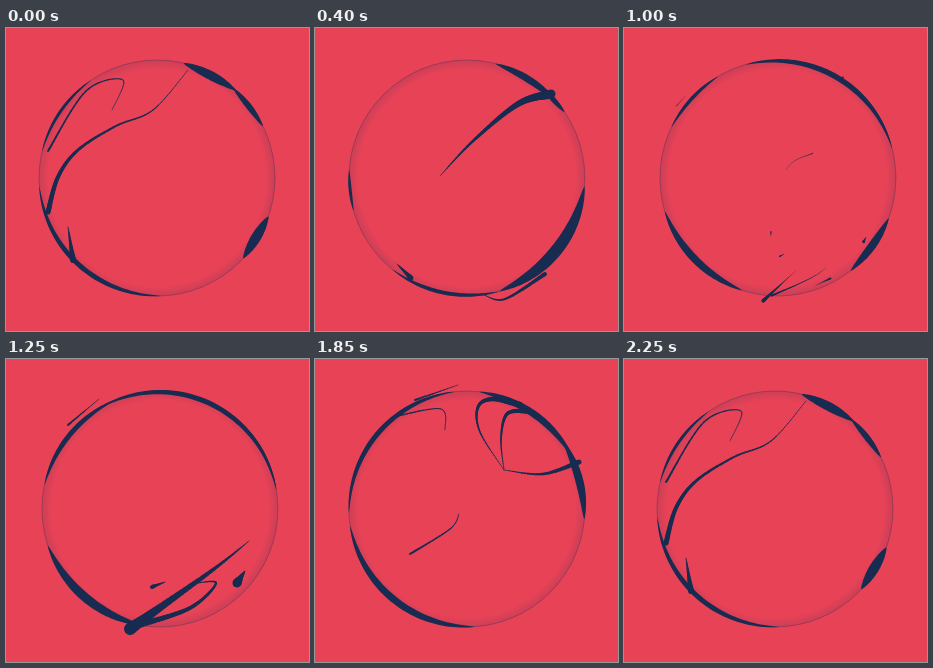
Write an HTML page with a canvas that moves like this. It is 303 px wide and 303 px high and loops after 2300 ms.

```html
<!DOCTYPE html>
<html lang="en">
<head>
<meta charset="utf-8">
<title>Ink sphere</title>
<style>
html, body { margin: 0; height: 100%; overflow: hidden; background: #e84257; }
canvas { display: block; width: 100vw; height: 100vh; }
</style>
</head>
<body>
<canvas id="stage" width="303" height="303"></canvas>
<script>
const ctx = document.getElementById('stage').getContext('2d');
const RED = '#e84257', NAVY = '#182b50', R = 118, CY = 150, LOOP = 2300, STEP = 50, END = 2250;

// rim: five ink patches as [from, to, thickness], angles in degrees.
// strands: [root thickness, x, y, x, y, ...], thinning toward the tip.
const swoosh = {
  at: 0,
  rim: [[193, 236, 3], [283, 312, 9], [310, 334, 6], [19, 43, 10], [88, 176, 5]],
  strands: [
    [5, 42, 184, 52, 149, 72, 122, 110, 98, 147, 82, 182, 42],
    [2, 42, 123, 80, 63, 117, 52, 106, 82],
    [6, 67, 232, 62, 199]]
};
const spear = {
  at: 400,
  rim: [[164, 184, 3], [284, 320, 7], [310, 326, 5], [4, 74, 12], [74, 129, 4]],
  strands: [
    [9, 236, 66, 203, 76, 158, 113, 125, 148],
    [4, 230, 246, 190, 271, 169, 267],
    [5, 96, 250, 82, 236]]
};
const drips = {
  at: 750,
  rim: [[219, 231, 2], [273, 337, 6], [300, 340, 3], [10, 62, 16], [117, 165, 6]],
  strands: [
    [1.5, 185, 121, 163, 136, 152, 170, 153, 200],
    [2, 153, 204, 154, 216],
    [5, 205, 42, 204, 55],
    [6, 218, 243, 179, 268]]
};
const splash = {
  at: 1250,
  rim: [[192, 248, 5], [235, 350, 5], [300, 351, 3], [30, 42, 0], [98, 162, 9]],
  strands: [
    [12, 124, 270, 152, 250, 208, 210, 243, 182],
    [6, 133, 266, 184, 249, 210, 224, 185, 225],
    [9, 231, 224, 239, 212],
    [4, 146, 228, 159, 223],
    [2, 62, 66, 93, 40]]
};
const crack = {
  at: 1600,
  rim: [[176, 272, 6], [255, 322, 4], [317, 342, 8], [0, 17, 8], [62, 152, 11]],
  strands: [
    [6, 265, 179, 230, 180, 207, 159, 180, 137, 189, 131],
    [4, 72, 240, 90, 223, 149, 179],
    [1.5, 211, 49, 166, 47, 137, 37],
    [3, 78, 53, 105, 35, 137, 24]]
};
const bubbles = {
  at: 1850,
  rim: [[178, 264, 5], [276, 335, 7], [325, 365, 8], [-4, 6, 0], [86, 172, 7]],
  strands: [
    [6, 205, 46, 178, 40, 163, 48, 165, 73, 189, 111],
    [5, 212, 52, 192, 55, 186, 80, 189, 111],
    [5, 264, 103, 228, 115, 189, 111],
    [2, 95, 195, 135, 170, 144, 155],
    [1.5, 82, 57, 126, 50, 130, 71],
    [2, 100, 41, 143, 26]]
};
const poses = [swoosh, spear, drips, splash, crack, bubbles];

const ease = k => k * k * (3 - 2 * k);
const mix = (a, b, k) => a.map((v, i) => v + (b[i] - v) * k);
const centerX = t => 152.5 - 1.5 * Math.cos(t / END * 2 * Math.PI);

function drawPatch([from, to, thick], cx) {
  const n = 48;
  ctx.beginPath();
  for (let i = -n; i <= n; i++) {
    const u = Math.abs(i) / n, a = (from + (to - from) * u) * Math.PI / 180;
    const side = i < 0 ? .25 : -.75;
    const r = R + side * thick * Math.abs(Math.sin(u * Math.PI)) ** .7;
    ctx.lineTo(cx + Math.cos(a) * r, CY + Math.sin(a) * r);
  }
  ctx.fill();
}

function spline(a, b, c, d, t) {
  return b + t * (c - a + t * (2 * a - 5 * b + 4 * c - d + t * (3 * (b - c) + d - a))) / 2;
}

// life thins the strand and draws its tip back to the root
function drawStrand([thick, ...pts], life) {
  const last = pts.length / 2 - 1, n = last * 14;
  const get = (i, c) => pts[Math.max(0, Math.min(last, i)) * 2 + c];
  const point = u => {
    const k = Math.min(Math.floor(u * last), last - 1), t = u * last - k;
    return [0, 1].map(c => spline(get(k - 1, c), get(k, c), get(k + 1, c), get(k + 2, c), t));
  };
  const reach = Math.min(1, life * 1.3);
  for (let i = 0; i < n; i++) {
    ctx.lineWidth = life * (.5 + (thick - .5) * (1 - i / n) ** 1.3);
    ctx.beginPath();
    ctx.moveTo(...point(i / n * reach));
    ctx.lineTo(...point((i + 1) / n * reach));
    ctx.stroke();
  }
}

function drawStrands(pose, life, turn, cx) {
  if (life <= 0) return;
  ctx.save();
  ctx.translate(cx, CY);
  ctx.rotate(turn);
  ctx.translate(-centerX(pose.at), -CY);
  pose.strands.forEach(s => drawStrand(s, life));
  ctx.restore();
}

function drawGlass(cx) {
  const shade = ctx.createRadialGradient(cx, CY, R * .92, cx, CY, R);
  shade.addColorStop(0, 'rgba(24,43,80,0)');
  shade.addColorStop(1, 'rgba(24,43,80,.14)');
  ctx.beginPath();
  ctx.arc(cx, CY, R, 0, Math.PI * 2);
  ctx.fillStyle = shade;
  ctx.fill();
  ctx.strokeStyle = 'rgba(24,43,80,.3)';
  ctx.lineWidth = 1;
  ctx.stroke();
}

function draw(now) {
  const t = Math.min(END, Math.floor(now % LOOP / STEP) * STEP);
  const i = poses.findLastIndex(p => p.at <= t);
  const pose = poses[i], next = poses[(i + 1) % poses.length];
  const u = (t - pose.at) / ((next.at || END) - pose.at), k = ease(u), cx = centerX(t);
  ctx.fillStyle = RED;
  ctx.fillRect(0, 0, 303, 303);
  drawGlass(cx);
  ctx.fillStyle = ctx.strokeStyle = NAVY;
  ctx.lineCap = 'round';
  pose.rim.forEach((patch, j) => drawPatch(mix(patch, next.rim[j], k), cx));
  drawStrands(pose, 1 - 1.4 * k, .25 * u, cx);
  drawStrands(next, 1 - 1.4 * (1 - k), .25 * (u - 1), cx);
}

const start = performance.now();
function tick() {
  draw(performance.now() - start);
  requestAnimationFrame(tick);
}
tick();
</script>
</body>
</html>
```
